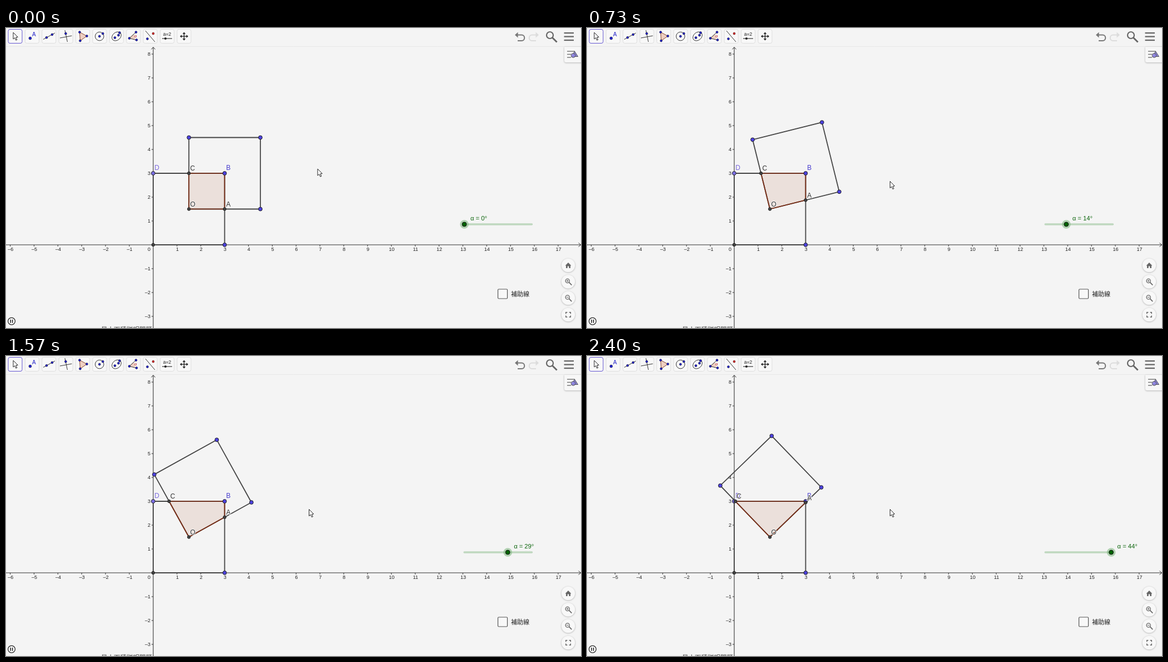
These frames come from a looping animation (1035x541 px, 2430 ms). An HTML page with a canvas:

```html
<!DOCTYPE html>
<html lang="ja">
<head>
<meta charset="utf-8">
<style>
html, body { margin: 0; height: 100%; overflow: hidden; background: #f4f4f4; }
canvas { display: block; }
</style>
</head>
<body>
<canvas id="stage" width="1035" height="541"></canvas>
<script>
const ctx = document.getElementById('stage').getContext('2d');
const SANS = '"Liberation Sans", Arial, sans-serif';
const CJK = '"Noto Sans CJK JP", "Noto Sans CJK", sans-serif';
const BG = '#f4f4f4', DARK = '#444', BLUE = '#4d42e0', LOOP = 2430;
// [time in ms, angle in degrees]
const KEYS = [[0, 0], [530, 10], [970, 19], [1300, 24], [1800, 33], [2130, 39], [2400, 44], [LOOP, 44]];

const X = x => 264.9 + 42.88 * x;
const Y = y => 391 - 43 * y;
const P = ([x, y]) => [X(x), Y(y)];

function paint(fill, stroke, width = 1) {
  if (fill) { ctx.fillStyle = fill; ctx.fill(); }
  if (stroke) { ctx.strokeStyle = stroke; ctx.lineWidth = width; ctx.stroke(); }
}

function path(points, { fill, stroke, width, close } = {}) {
  ctx.beginPath();
  points.forEach(p => ctx.lineTo(...p));
  if (close) ctx.closePath();
  paint(fill, stroke, width);
}

function line(x1, y1, x2, y2, stroke = '#333', width = 1) {
  path([[x1, y1], [x2, y2]], { stroke, width });
}

function dot(x, y, r, fill, stroke, width) {
  ctx.beginPath();
  ctx.arc(x, y, r, 0, 7);
  paint(fill, stroke, width);
}

function box(x, y, w, h, r, fill, stroke, width) {
  ctx.beginPath();
  ctx.roundRect(x, y, w, h, r);
  paint(fill, stroke, width);
}

function text(s, x, y, size, color, { align = 'left', font = SANS, halo } = {}) {
  ctx.font = `${size}px ${font}`;
  ctx.textAlign = align;
  if (halo) {
    ctx.strokeStyle = BG;
    ctx.lineWidth = 2;
    ctx.strokeText(s, x, y);
  }
  ctx.fillStyle = color;
  ctx.fillText(s, x, y);
}

function pointer(x, y) {
  const shape = [[0, 0], [0, 12], [2.8, 9.6], [4.8, 14], [6.8, 13.2], [4.9, 8.8], [8.3, 8.5]];
  path(shape.map(([a, b]) => [x + a, y + b]), { fill: '#fff', stroke: '#222', close: true });
}

const bluePoint = (x, y, r = 1.9) => dot(x, y, r, '#2020d8', '#113', 0.7);

const icons = [
  () => pointer(13, 8),
  () => { bluePoint(43.5, 18.5, 2.4); text('A', 47, 15, 10, '#2020c8'); },
  () => { line(67, 20.5, 88, 9); bluePoint(73, 17.2); bluePoint(83, 11.8); },
  () => { line(97, 18, 118.5, 14); line(106, 4, 110.5, 25); bluePoint(107.5, 10); },
  () => {
    const corners = [[132.5, 7.5], [145.5, 14.5], [133.5, 23]];
    path(corners, { fill: '#eecfc2', stroke: '#8a4a35', close: true });
    corners.forEach(c => bluePoint(...c));
  },
  () => { dot(168.3, 15, 7.8, null, '#333'); bluePoint(168.3, 15); bluePoint(174.3, 10); },
  () => {
    ctx.beginPath();
    ctx.ellipse(199, 15, 9.3, 7, -0.7, 0, 7);
    paint(null, '#333');
    bluePoint(196, 17.5); bluePoint(202.5, 13); bluePoint(204.5, 8.5);
  },
  () => {
    path([[222, 18.5], [229, 11], [233, 15], [232, 20.5]], { fill: '#eecfc2' });
    line(222, 18.5, 234.5, 7); line(222, 18.5, 236, 22);
    bluePoint(222, 18.5); bluePoint(234, 7.5); bluePoint(235, 21.5);
    text('α', 231, 17, 8, '#b33');
  },
  () => {
    line(251, 5, 268, 25);
    bluePoint(254.5, 19.5);
    dot(265, 10, 1.9, '#d22', '#511', 0.7);
  },
  () => {
    text('a=2', 290, 13.5, 8.5, '#222', { align: 'center' });
    line(281, 19, 299, 19, '#333', 1.2);
    dot(287, 19, 2, '#222');
  },
  () => {
    line(314, 15, 327, 15, '#222', 1.3); line(320.5, 8.5, 320.5, 21.5, '#222', 1.3);
    for (let i = 0; i < 4; i++) {
      ctx.save();
      ctx.translate(320.5, 15);
      ctx.rotate(i * Math.PI / 2);
      path([[7.5, 0], [4.2, -2.8], [4.2, 2.8]], { fill: '#222' });
      ctx.restore();
    }
  }
];

function curvedArrow(x, y, dir, color) {
  path([[x - 9 * dir, y - 3], [x - 3.5 * dir, y - 8], [x - 3.5 * dir, y + 2]], { fill: color });
  ctx.beginPath();
  ctx.moveTo(x - 5 * dir, y - 3);
  ctx.lineTo(x + 3 * dir, y - 3);
  ctx.bezierCurveTo(x + 10 * dir, y - 3, x + 10 * dir, y + 7.5, x + 3 * dir, y + 7.5);
  ctx.lineTo(x - 4 * dir, y + 7.5);
  paint(null, color, 2);
}

function magnifier(x, y, r, width, sign) {
  dot(x, y, r, null, '#666', width);
  line(x + r * 0.75, y + r * 0.75, x + r * 2.1, y + r * 2.1, '#666', width * 1.3);
  if (sign) line(x - 2, y, x + 2, y, '#666');
  if (sign === '+') line(x, y - 2, x, y + 2, '#666');
}

function toolbar() {
  line(0, 33.5, 1035, 33.5, '#e8e8e8');
  icons.forEach((icon, i) => {
    box(4 + 30.4 * i, 2.5, 25, 25, 3, '#f8f8f8', i ? '#dedede' : '#6557d2');
    icon();
  });
  curvedArrow(925, 15.5, 1, '#777');
  curvedArrow(950, 15.5, -1, '#dcdcdc');
  magnifier(979, 13, 6, 2.2);
  for (const y of [9, 15.5, 22]) line(1004.5, y, 1022, y, '#666', 2.3);
}

function shadowed(draw) {
  ctx.save();
  ctx.shadowColor = 'rgba(0,0,0,.3)';
  ctx.shadowBlur = 3;
  ctx.shadowOffsetY = 0.7;
  draw();
  ctx.restore();
}

function sideControls() {
  shadowed(() => box(1005, 34, 34, 28, [0, 0, 0, 3], '#f7f7f7'));
  for (const y of [42, 47.5, 53]) line(1010, y, y === 42 ? 1024 : 1017, y, '#777', 1.5);
  path([[1023.5, 42], [1029.5, 51.5], [1018.5, 51.5]], { fill: '#8b83d8', stroke: '#555', close: true });
  dot(1021, 49.5, 3.8, 'rgba(145,135,235,.8)', '#555');

  for (const y of [428, 457.5, 487, 517]) shadowed(() => dot(1012, y, 12.2, '#f8f8f8'));
  path([[1006.5, 428.5], [1012, 423], [1017.5, 428.5], [1016, 428.5], [1016, 433], [1013.3, 433],
    [1013.3, 429.5], [1010.7, 429.5], [1010.7, 433], [1008, 433], [1008, 428.5]], { fill: '#666' });
  magnifier(1010.7, 456, 3.6, 1.3, '+');
  magnifier(1010.7, 485.5, 3.6, 1.3, '-');
  for (const sx of [-1, 1]) for (const sy of [-1, 1]) {
    const x = 1012 + 4.3 * sx, y = 517 + 4.3 * sy;
    path([[x - 2.7 * sx, y], [x, y], [x, y - 2.7 * sy]], { stroke: '#666', width: 1.4 });
  }

  dot(10, 528.8, 6.4, '#fff', '#222', 1.3);
  line(8.3, 525.8, 8.3, 531.8, '#222', 1.6);
  line(11.7, 525.8, 11.7, 531.8, '#222', 1.6);

  box(885.5, 471, 17, 17, 1.5, '#f8f8f8', '#555', 1.2);
  text('補助線', 909, 483.5, 11, '#222', { font: CJK });
  text('最小面積説明問題', 171, 548, 11.5, '#444', { font: CJK });
}

function axes() {
  line(0, 391, 1035, 391, '#333', 1.1);
  line(265, 35, 265, 541, '#333', 1.1);
  path([[261.5, 38.5], [265, 34.5], [268.5, 38.5]], { stroke: '#333' });
  path([[1030.5, 387.5], [1034.5, 391], [1030.5, 394.5]], { stroke: '#333' });
  const label = n => n < 0 ? '–' + -n : '' + n;
  for (let n = -6; n <= 17; n++) {
    if (!n) continue;
    line(X(n), 391, X(n), 394, '#333');
    text(label(n), X(n) + 0.6, 401.7, 9, '#222', { align: 'center' });
    if (n < -3 || n > 8) continue;
    line(262, Y(n), 265, Y(n), '#333');
    text(label(n), 260, Y(n) + 3, 9, '#222', { align: 'right' });
  }
  text('0', 260, 401.7, 9, '#222', { align: 'right' });
}

function figure(angle) {
  const a = angle * Math.PI / 180, cos = 3 * Math.cos(a), sin = 3 * Math.sin(a);
  const O = [1.5, 1.5], B = [3, 3], D = [0, 3];
  const A = [3, 1.5 + 1.5 * Math.tan(a)], C = [1.5 - 1.5 * Math.tan(a), 3];
  const turned = [[cos, sin], [cos - sin, sin + cos], [-sin, cos]].map(([x, y]) => [1.5 + x, 1.5 + y]);
  const outline = { stroke: DARK, width: 1.8, close: true };

  path([[0, 0], [3, 0], B, D].map(P), outline);
  path([O, ...turned].map(P), outline);
  path([O, A, B, C].map(P), { fill: 'rgba(153,51,0,.1)', stroke: '#7a2c14', width: 1.7, close: true });

  const corner = (p, fill = BLUE) => dot(...P(p), 3.4, fill, '#222');
  [...turned, [3, 0], B].forEach(p => corner(p));
  corner(D, '#7d70e8');
  [[0, 0], O, A, C].forEach(p => dot(...P(p), 2.7, DARK, '#222'));

  const name = (s, p, dx, dy, color) => text(s, X(p[0]) + dx, Y(p[1]) - dy, 12, color, { halo: true });
  name('D', D, 2.3, 6.2, '#7866dc');
  name('B', B, 2.6, 6.2, '#4a3fcf');
  name('O', O, 2.3, 4.7, '#333');
  name('A', A, 2.6, 4.7, '#333');
  name('C', C, 2.2, 4.7, '#333');
}

function slider(angle) {
  const x = 825 + 2.695 * angle;
  ctx.lineCap = 'round';
  line(825, 354, 946.5, 354, '#bfd8bf', 3.4);
  ctx.lineCap = 'butt';
  dot(x, 354, 7.8, 'rgba(120,180,120,.55)');
  dot(x, 354, 3.9, '#006400', '#111');
  text(`α = ${angle}°`, x + 11, 347, 11.2, '#0a640a');
}

function angleAt(t) {
  const i = KEYS.findIndex(([end]) => t < end);
  const [t0, a0] = KEYS[i - 1], [t1, a1] = KEYS[i];
  return Math.round(a0 + (a1 - a0) * (t - t0) / (t1 - t0));
}

function frame() {
  const t = performance.now() % LOOP, angle = angleAt(t);
  ctx.fillStyle = BG;
  ctx.fillRect(0, 0, 1035, 541);
  toolbar();
  axes();
  figure(angle);
  slider(angle);
  sideControls();
  const moved = Math.min(t / 250, 1);
  pointer(561 - 15.5 * moved, 254 + 22.5 * moved);
  requestAnimationFrame(frame);
}
frame();
</script>
</body>
</html>
```
